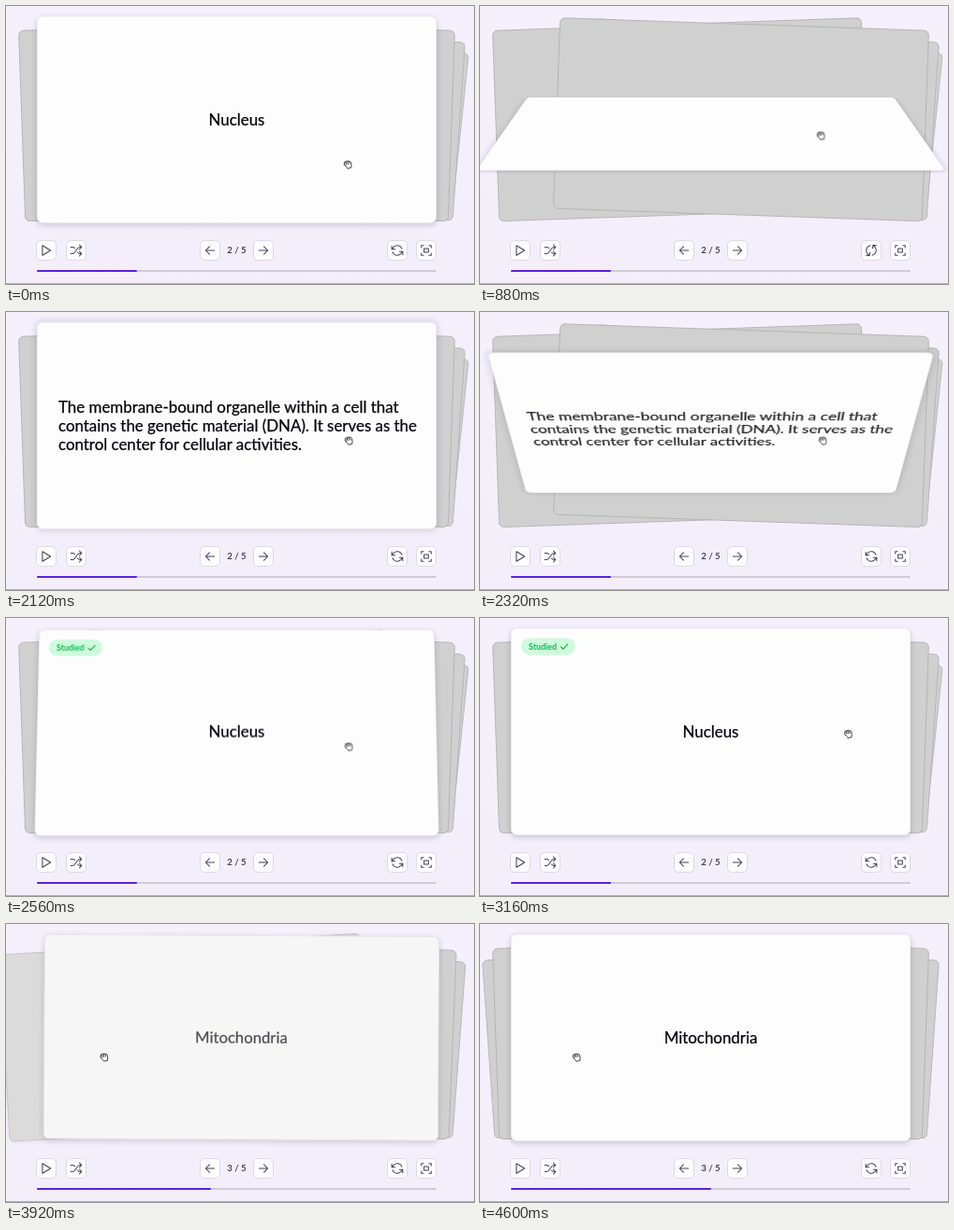
These frames come from a looping animation (500 by 298 pixels, 4.64 s). An HTML page:

```html
<!DOCTYPE html>
<html lang="en">
<head>
<meta charset="utf-8">
<title>Flashcards</title>
<style>
  html, body { margin: 0; width: 100%; height: 100%; overflow: hidden; }
  body { background: linear-gradient(#f5f0fc, #f3eefa); font-family: Lato, "Open Sans", sans-serif; }
  #stage { position: absolute; left: 0; top: 0; width: 500px; height: 298px; overflow: hidden; }
  #stage::after { content: ""; position: absolute; left: 0; bottom: 0; width: 100%; height: 1px; background: #b3aeba; }
  .card { position: absolute; left: 33px; top: 11px; width: 427px; height: 222px; }
  .face {
    position: absolute; inset: 0; box-sizing: border-box; border: 1px solid; border-radius: 6px;
    display: flex; align-items: center; justify-content: center;
    font-size: 16.9px; line-height: 20px; color: #06050d;
  }
  .text { white-space: pre; -webkit-text-stroke: .25px #06050d; }
  .back { justify-content: flex-start; padding-left: 22px; }
  .badge {
    position: absolute; left: 10px; top: 10px; width: 58px; height: 18px; border-radius: 9px;
    box-sizing: border-box; padding-left: 8px; background: #cffbdd; color: #14b850;
    font: bold 8.9px/18px Lato, sans-serif;
  }
  .badge svg { position: absolute; left: 41px; top: 4px; }
  .btn {
    position: absolute; top: 251px; width: 22px; height: 22px; box-sizing: border-box;
    border: 1px solid #ddd9e7; border-radius: 5px; background: #fdfcff;
  }
  .btn svg { position: absolute; left: 3px; top: 3px; }
  svg { fill: none; stroke-linecap: round; stroke-linejoin: round; overflow: visible; }
  #count {
    position: absolute; left: 226px; top: 255px; width: 41px; text-align: center;
    font: bold 9.6px/14px Lato, sans-serif; color: #45445c;
  }
  #track, #fill { position: absolute; height: 2px; border-radius: 1px; }
  #track { left: 33px; top: 283px; width: 427px; background: #d0cbd9; }
  #fill { background: #5a22e0; }
  #cursor { position: absolute; left: 0; top: 0; z-index: 100; }
</style>
</head>
<body>
<div id="stage">
  <div id="deck"></div>
  <div id="count"></div>
  <div id="track"><div id="fill"></div></div>
  <svg id="cursor" width="12" height="12" viewBox="0 0 16 16" stroke="#2c2c2c" stroke-width="1.1">
    <path id="hand" fill="#fff"/><path id="fingers"/>
  </svg>
</div>
<script>
const LOOP = 4640;
const FLIPS = [690, 2168], FLIP_TIME = 442, SPIN_TIME = 600;
const DRAG = 3300, DRAG_TIME = 700, RELEASE = 3760, SETTLED = 4200;
const MAIN = 1;

const $ = id => document.getElementById(id);
const clamp = x => Math.max(0, Math.min(1, x));
const mix = (a, b, k) => a + (b - a) * k;
const span = (t, from, to) => clamp((t - from) / (to - from));
const sine = u => (1 - Math.cos(Math.PI * u)) / 2;
const cubic = u => u < .5 ? 4 * u ** 3 : 1 - 4 * (1 - u) ** 3;
const easeOut = u => 1 - (1 - u) ** 3;

function add(parent, cls, html = "") {
  const el = document.createElement("div");
  el.className = cls;
  el.innerHTML = html;
  parent.append(el);
  return el;
}

// Controls
const ICONS = [
  [43, "M5 3l15 9-15 9z"],
  [75, "M2 18h3.5c2 0 3-1 4-2.5l5-7C15.5 7 17 6 19 6h3M18 2l4 4-4 4M2 6h3.5c2 0 3 1 4 2M14.5 15.5c1 1.6 2.5 2.5 4.5 2.5h3M18 14l4 4-4 4"],
  [217.5, "M20 12H4M11 5l-7 7 7 7"],
  [275, "M4 12h16M13 5l7 7-7 7"],
  [418, "M2 4v6h6M22 20v-6h-6M20.5 9A9 9 0 0 0 5.6 5.6L2 10M3.5 15a9 9 0 0 0 14.9 3.4L22 14"],
  [449, "M3 7V3h4M17 3h4v4M21 17v4h-4M7 21H3v-4M8 8.5h8v7H8z"]
];
const buttons = ICONS.map(([x, d]) => {
  const b = add($("stage"), "btn", `<svg width="14" height="14" viewBox="0 0 24 24"
    stroke="#45445c" stroke-width="1.8"><path d="${d}"/></svg>`);
  b.style.left = x - 11 + "px";
  return b.firstChild;
});
const refresh = buttons[4];

// Cards
const TITLES = ["", "Nucleus", "Mitochondria", "", ""];
const DEFINITION = "The membrane-bound organelle within a cell that\n" +
  "contains the genetic material (DNA). It serves as the\n" +
  "control center for cellular activities.";
const cards = TITLES.map(title => {
  const el = add($("deck"), "card");
  const face = add(el, "face");
  return { el, face, text: add(face, "text", title) };
});
const main = cards[MAIN];
const badge = add(main.face, "badge", `Studied<svg width="10" height="10" viewBox="0 0 10 10"
  stroke="#14b850" stroke-width="1.2"><path d="M1.5 5.3l2.3 2.3L8.5 2.5"/></svg>`);
const back = add(main.el, "face back");
const backText = add(back, "text", DEFINITION);

const OFFSET = [0, 32.5, 53.5, 68], SCALE = [1, .925, .865, .805];

function slot(pos) {
  const n = Math.min(3, Math.abs(pos)), i = Math.min(2, Math.floor(n)), k = n - i;
  const side = Math.sign(pos);
  return {
    x: side * mix(OFFSET[i], OFFSET[i + 1], k),
    scale: mix(SCALE[i], SCALE[i + 1], k),
    turn: side * 2 * n
  };
}

function paint(face, shade, shadow = "0 2px 6px") {
  const fill = mix(253, 208, shade), edge = mix(240, 180, shade);
  face.style.background = `rgb(${fill},${fill},${fill})`;
  face.style.borderColor = `rgb(${edge},${edge},${edge + 3})`;
  face.style.boxShadow = `${shadow} rgba(30,20,50,${.2 * (1 - shade)})`;
}

function place(card, pose, shade, z) {
  card.el.style.transform =
    `translate(${pose.x}px,-.3px) rotate(${pose.turn}deg) scale(${pose.scale})`;
  card.el.style.zIndex = z;
  paint(card.face, shade);
}

function flip(deg) {
  const rad = deg * Math.PI / 180, lift = Math.sin(rad) ** 4;
  const cos = Math.cos(rad);
  const turn = a => `perspective(880px) translateY(${13 * lift}px) translateZ(${33 * lift}px) rotateX(${a}deg)`;
  main.face.style.transform = deg ? turn(deg) : "none";
  back.style.transform = deg < 180 ? turn(deg - 180) : "none";
  main.face.style.visibility = deg < 90 ? "visible" : "hidden";
  back.style.visibility = deg < 90 ? "hidden" : "visible";
  main.text.style.opacity = badge.style.opacity = clamp((cos - .4) / .3);
  backText.style.opacity = clamp((-cos - .4) / .3);
}

// Pointer
const OPEN = "M4.5 9C2 7 2.500 5.5 4.5 6.5L3.8 4.3C3.8 2.7 5.6 2.7 6 4.2 6 2 8.2 2 8.4 3.7 9 2.2 10.7 2.6 10.8 4.3 11.8 3.4 13.2 4 13.2 5.5V9C13.2 11 12 12 12 13.5H6.5C6.5 12 5.5 11 4.5 9Z";
const FIST = "M4.2 9.5C2 8 2.5 6.5 4 7V6C4 4.3 5.8 4.3 6.2 5 6.6 3.9 8 3.9 8.5 4.9 9 4 10.5 4.1 10.9 5.2 12 4.5 13.3 5 13.3 6.5V9.5C13.3 11 12 11.5 12 13H6.5C6.5 12 5.3 11.5 4.2 9.5Z";

function pointer(t) {
  const rise = sine(span(t, 20, 200)), drift = span(t, 1260, 1360);
  const approach = sine(span(t, 2660, 3220)), drag = cubic(span(t, DRAG, DRAG + DRAG_TIME));
  return {
    x: 365 - rise + 2 * drift + 28 * approach - 291 * drag,
    y: 170 - 31 * rise - drift - 14 * approach + 19 * drag
  };
}

function drawPointer(t, p) {
  const held = t >= DRAG - 60 && t < RELEASE;
  $("hand").setAttribute("d", held ? FIST : OPEN);
  $("fingers").setAttribute("d", held ? "M6.3 5v2M8.6 5v2M10.9 5.3v1.8" : "M6 4.2l.5 3M8.4 3.7v3.5M10.8 4.3v3");
  $("cursor").style.transform = `translate(${p.x - 6}px,${p.y - 6}px) rotate(-12deg)`;
}

function render(t) {
  const p = pointer(t), grip = pointer(Math.min(t, RELEASE));
  const settle = easeOut(span(t, RELEASE, SETTLED));
  const dx = t < DRAG ? 0 : (grip.x - 394) / 2;
  const shift = mix(-dx / 300, 1, settle);

  cards.forEach((card, i) => {
    const pos = i - MAIN - shift, far = Math.abs(pos);
    const z = 50 - Math.round(far * 10) * 2 + (pos > 0 ? 1 : 0);
    if (i !== MAIN) {
      place(card, slot(pos), clamp(far), z);
      card.text.style.opacity = clamp(1 - 2 * far);
      return;
    }
    const end = slot(-1);
    place(card, {
      x: mix(dx, end.x, settle),
      turn: mix(dx * .061, end.turn, settle),
      scale: mix(1 + dx * .0012, end.scale, settle)
    }, settle, t < RELEASE ? 60 : z);
  });

  const [there, home] = FLIPS.map(s => sine(span(t, s, s + FLIP_TIME)));
  flip(180 * (there - home));
  paint(back, 0, "0 0 8px");
  badge.style.display = t > FLIPS[1] ? "block" : "none";
  if (t >= RELEASE) main.text.style.opacity = badge.style.opacity = clamp(1 - 2 * settle);
  refresh.style.transform = `rotate(${-360 * sine(span(t, FLIPS[0], FLIPS[0] + SPIN_TIME))}deg)`;

  $("count").textContent = t < RELEASE + 20 ? "2 / 5" : "3 / 5";
  $("fill").style.width = 25 * (1 + settle) + "%";
  drawPointer(t, p);
}

const start = performance.now();
function tick() {
  render((performance.now() - start) % LOOP);
  requestAnimationFrame(tick);
}
tick();
</script>
</body>
</html>
```
